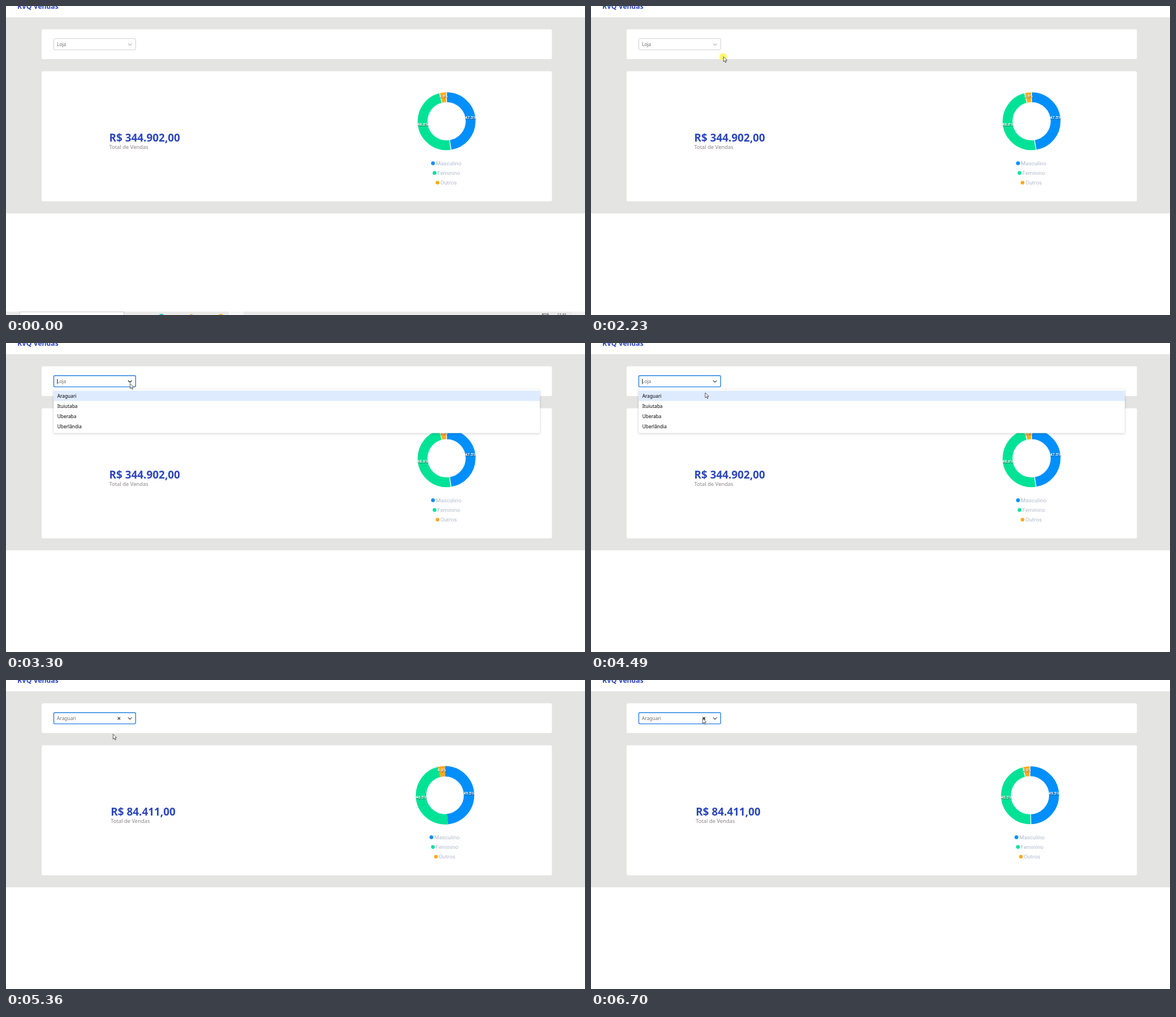
An HTML page for the animation above (8000 ms loop, 1024x547 px).

```html
<!DOCTYPE html>
<html lang="pt-BR">
<head>
<meta charset="utf-8">
<title>Vendas</title>
<style>
  html, body { margin: 0; width: 100%; height: 100%; overflow: hidden; background: #fff; }
  svg { display: block; width: 100%; height: 100%; }
  text { font-family: "Noto Sans", "Open Sans", sans-serif; font-weight: 500; }
  .title, .total { font-weight: 700; fill: #2c46bd; }
  .title { font-size: 12.2px; }
  .total { font-size: 18.9px; }
  .caption { font-size: 9.4px; fill: #8a8383; }
  .field { font-size: 8.4px; fill: #6b6b6b; }
  .option { font-size: 8.3px; fill: #000; }
  .legend { font: 400 9.75px Roboto, sans-serif; fill: #b1bccd; }
  .percent { font: 700 6.9px Roboto, sans-serif; fill: #fff; text-anchor: middle;
    text-shadow: .5px .5px 1px rgba(0, 0, 0, .6); }
  .tray { font-size: 6.4px; fill: #333; }
  .menu { filter: drop-shadow(0 1.5px 2px rgba(0, 0, 0, .2)); }
</style>
</head>
<body>
<svg viewBox="0 0 1024 547">
  <rect width="1024" height="547" fill="#fff"/>
  <text class="title" x="20" y="5.3">RVQ Vendas</text>
  <rect y="20" width="1024" height="347" fill="#e4e4e2"/>
  <rect x="63" y="41.3" width="902.5" height="52.7" rx="2.5" fill="#fff"/>
  <rect x="63" y="115.5" width="902.5" height="230.3" rx="2.5" fill="#fff"/>

  <g id="summary">
    <text id="total" class="total" y="240"></text>
    <text class="caption" y="253.3">Total de Vendas</text>
  </g>
  <g id="chart">
    <g id="ring" fill="none" transform="translate(0 204) rotate(-90)"></g>
    <g id="percents"></g>
    <g id="legend"></g>
  </g>

  <rect id="control" x="84.5" y="57.7" width="144.8" height="19.9" rx="2" fill="#fff"/>
  <text id="value" class="field" x="90" y="71"></text>
  <path id="caret" d="M90.8 63.5v9.5" stroke="#222" stroke-width=".8"/>
  <path id="clear" d="M197.6 65.6l4.4 4.6m0-4.6l-4.4 4.6" fill="none" stroke-width="1.3"/>
  <path id="chevron" d="M216.2 66.6l3 2.9 3-2.9" fill="none" stroke-width="1.3" stroke-linecap="round"/>

  <g id="menu">
    <rect class="menu" x="84.3" y="82.2" width="859.7" height="77.2" rx="2" fill="#fff"/>
    <rect x="84.3" y="84.4" width="859.7" height="18.2" fill="#deebff"/>
  </g>

  <g id="taskbar">
    <rect y="541" width="1024" height="40" fill="#ebebea"/>
    <rect x="24.5" y="541.5" width="184" height="39" fill="#fff" stroke="#c9c9c9"/>
    <rect x="394" y="541" width="26" height="40" fill="#f7f7f7"/>
    <rect x="1002" y="541" width="22" height="40" fill="#f1f1f1"/>
    <circle cx="275" cy="551.5" r="6.5" fill="#1fbdb5"/>
    <circle cx="327.5" cy="549.5" r="4" fill="#f0a02c"/>
    <circle cx="380" cy="551.5" r="6.5" fill="#f3b325"/>
    <text class="tray" x="947.5" y="549.3">POR</text>
    <text id="clock" class="tray" x="975" y="548.6"></text>
  </g>

  <circle id="click" r="6.6" fill="#fff45e" opacity=".9"/>
  <path id="cursor" d="M0 0v8.9l2.1-1.9 1.5 3.4 1.5-.7-1.5-3.2h2.7z" fill="#fff" stroke="#333" stroke-width=".8" stroke-linejoin="round"/>
</svg>
<script>
const LOOP = 8000;
const MENU_OPEN = 3070, MENU_CLOSE = 5050, DATA_SWAP = 5150, CHART_ANIMATION = 800;
const CLICKS = [[2180, 2330], [3030, 3150], [4990, 5120]];
const COLORS = ["#008ffb", "#00e396", "#fbab1e"];
const STORES = ["Araguari", "Ituiutaba", "Uberaba", "Uberlândia"];

// Pointer stops: time, x, y
const POINTER = [
  [90, 407, 549], [860, 89, 71.5], [910, 89, 71.5], [1260, 115, 72.3], [1670, 115, 72.3],
  [2180, 234.3, 89.7], [2490, 234.3, 89.7], [3000, 219.5, 72], [3300, 219.5, 71.7],
  [3570, 219.5, 71.7], [4120, 215, 84], [4270, 215, 84], [4490, 202, 88],
  [4740, 194, 95], [4990, 194, 95], [5330, 189.3, 95.8], [5830, 189.3, 95.8],
  [6590, 197.5, 67], [6700, 197.5, 68]
];

const ALL = { total: "R$ 344.902,00", totalX: 182.5, centerX: 779.2, shares: [47.5, 48.6, 3.9],
  labels: [[42.3, 200.4], [-42.2, 212.4], [-5.4, 162]] };
const ONE = { total: "R$ 84.411,00", totalX: 185.2, centerX: 776.4, shares: [49.5, 46.5, 4],
  labels: [[42.3, 203], [-42.2, 210.4], [-5.6, 162]] };

const $ = id => document.getElementById(id);
const set = (el, attrs) => { for (const k in attrs) el.setAttribute(k, attrs[k]); };
const show = (id, on) => $(id).setAttribute("visibility", on ? "visible" : "hidden");
const mix = (a, b, p) => a + (b - a) * p;
const clamp = p => Math.min(1, Math.max(0, p));

function add(parent, tag, attrs, text = "") {
  const el = document.createElementNS(parent.namespaceURI, tag);
  set(el, attrs);
  el.textContent = text;
  return parent.appendChild(el);
}

const arcs = COLORS.map(stroke => add($("ring"), "circle", { r: 42.5, stroke, pathLength: 100 }));
const gaps = COLORS.map(() => add($("ring"), "path", { d: "M32 0H53", stroke: "#fff", "stroke-width": 1.3 }));
const percents = COLORS.map(() => add($("percents"), "text", { class: "percent" }));
[["Masculino", -24], ["Feminino", -21.3], ["Outros", -16]].forEach(([name, x], i) => {
  const y = 278.4 + i * 17.2;
  add($("legend"), "circle", { cx: x, cy: y, r: 3.3, fill: COLORS[i] });
  add($("legend"), "text", { class: "legend", x: x + 5, y: y + 3.4 }, name);
});
STORES.forEach((name, i) => add($("menu"), "text", { class: "option", x: 90.8, y: 96.6 + i * 18.25 }, name));

function pointerAt(t) {
  const next = POINTER.findIndex(stop => stop[0] > t);
  if (next < 0) return POINTER.at(-1).slice(1);
  if (next === 0) return POINTER[0].slice(1);
  const [t0, x0, y0] = POINTER[next - 1], [t1, x1, y1] = POINTER[next];
  const p = (t - t0) / (t1 - t0), eased = p * p * (3 - 2 * p);
  return [mix(x0, x1, eased), mix(y0, y1, eased)];
}

function drawChart(t) {
  const data = t < DATA_SWAP ? ALL : ONE;
  const progress = clamp((t - DATA_SWAP) / CHART_ANIMATION);
  const eased = Math.sin(progress * Math.PI / 2);
  const settled = progress === 0 || progress === 1;
  $("total").textContent = data.total;
  set($("summary"), { transform: `translate(${data.totalX} 0)` });
  set($("chart"), { transform: `translate(${data.centerX} 0)` });
  let start = 0;
  data.shares.forEach((share, i) => {
    const size = mix(ALL.shares[i], ONE.shares[i], eased);
    const [x, y] = data.labels[i];
    set(arcs[i], { "stroke-dasharray": `${size} ${100 - size}`, "stroke-dashoffset": -start,
      "stroke-width": settled ? 17.4 : 18.4 });
    set(gaps[i], { transform: `rotate(${start * 3.6})`, visibility: settled ? "visible" : "hidden" });
    set(percents[i], { x, y });
    percents[i].textContent = share.toFixed(1) + "%";
    start += size;
  });
}

function drawSelect(t, x, y) {
  const open = t >= MENU_OPEN && t < MENU_CLOSE;
  const chosen = t >= MENU_CLOSE;
  const focused = open || chosen;
  const hover = x > 84 && x < 230 && y > 57 && y < 78;
  const onChevron = hover && x > 209;
  const onClear = hover && x > 190 && x < 209;
  show("menu", open);
  show("clear", chosen);
  show("caret", open && (t - MENU_OPEN) % 1000 < 500);
  $("value").textContent = chosen ? STORES[0] : "Loja";
  set($("control"), { stroke: focused ? "#2680e3" : hover ? "#b3b0a8" : "#cfcfcf", "stroke-width": focused ? 1.4 : 1 });
  set($("chevron"), { stroke: focused ? (onChevron ? "#222" : "#625a5a") : onChevron ? "#999" : "#bdbdbd" });
  set($("clear"), { stroke: onClear ? "#111" : "#4a4646" });
}

function draw(t) {
  const [x, y] = pointerAt(t);
  drawChart(t);
  drawSelect(t, x, y);
  $("clock").textContent = t < 300 ? "11:41" : "11:42";
  set($("taskbar"), { transform: `translate(0 ${8 * clamp((t - 2080) / 100)})` });
  show("click", CLICKS.some(([from, to]) => t >= from && t < to));
  set($("click"), { cx: x - .6, cy: y + .3 });
  set($("cursor"), { transform: `translate(${x} ${y})` });
}

function frame() {
  draw(performance.now() % LOOP);
  requestAnimationFrame(frame);
}
frame();
</script>
</body>
</html>
```
